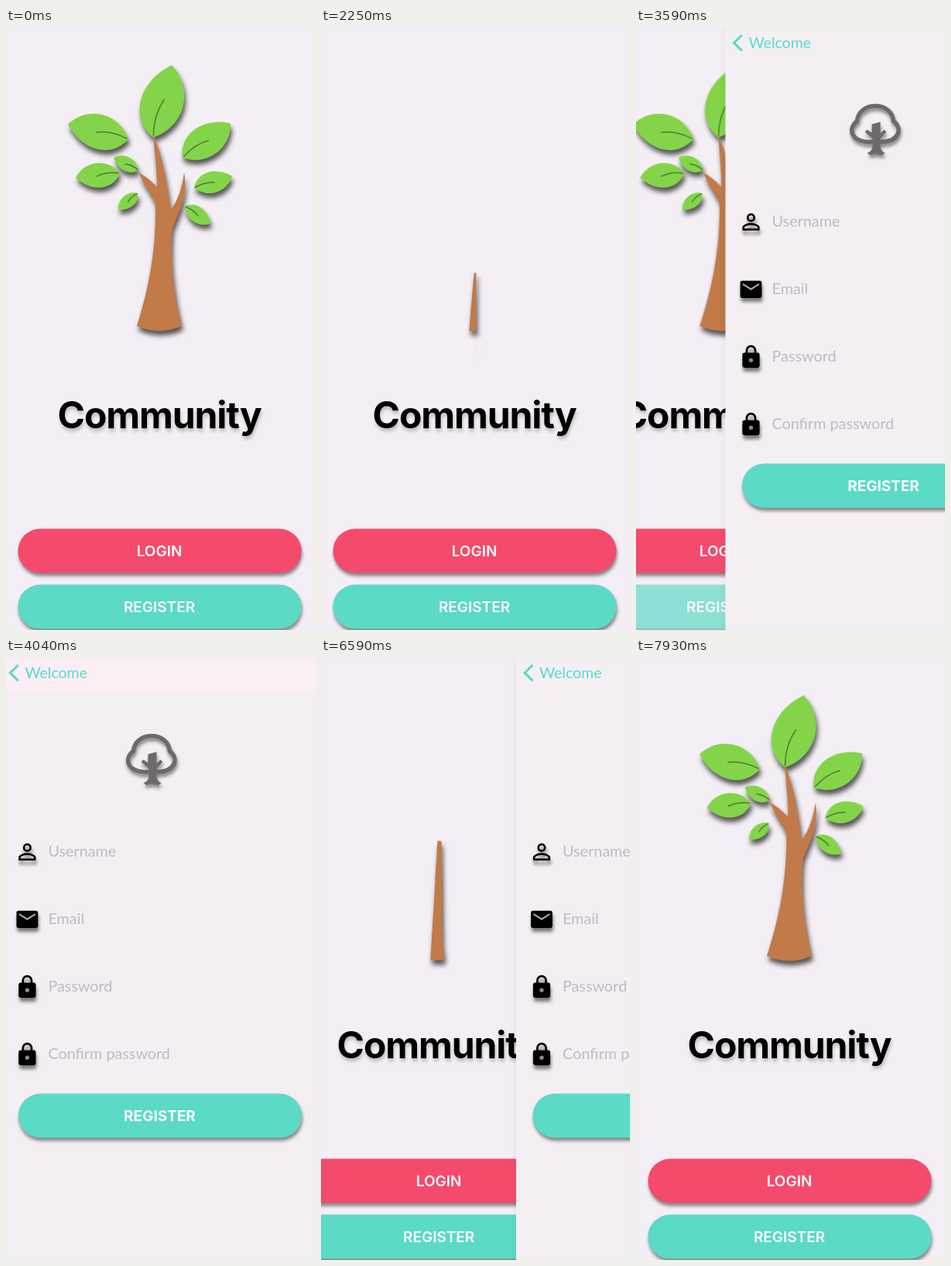
Animation, 399 px wide and 776 px high, one loop 8000 ms. Source, as an HTML page:

```html
<!DOCTYPE html>
<html lang="en">
<head>
<meta charset="utf-8">
<style>
  html, body { margin: 0; width: 100%; height: 100%; overflow: hidden; background: #f4eff5; }
  svg { display: block; width: 100%; height: 100%; }
  .title { font: 700 48px Inter, sans-serif; letter-spacing: -1.1px; filter: drop-shadow(1px 4px 2px rgba(0,0,0,.22)); }
  .label { font: 600 19px Inter, sans-serif; fill: #fff; }
  .field { font: 400 19.8px Lato, sans-serif; fill: #bfbbc0; }
  .back { font: 400 19.5px Lato, sans-serif; fill: #5bdac5; }
  .mid { text-anchor: middle; }
  .lift { filter: drop-shadow(1px 4px 2px rgba(0,0,0,.45)); }
  .icons { filter: drop-shadow(1px 5px 2px rgba(0,0,0,.5)); }
  .tree { filter: drop-shadow(2px 6px 3px rgba(0,0,0,.65)); }
  .line { fill: none; stroke: #000; stroke-width: 1.9; }
</style>
</head>
<body>
<svg viewBox="0 0 399 776" preserveAspectRatio="none">
  <defs>
    <linearGradient id="edge"><stop stop-color="#000" stop-opacity="0"/><stop offset="1" stop-color="#000" stop-opacity=".03"/></linearGradient>
    <g id="lock">
      <rect x="4" y="8" width="16" height="14" rx="2"/>
      <path class="line" d="M8 9V6a4 4 0 0 1 8 0v3"/>
      <circle cx="12" cy="15" r="1.9" fill="#8d8a8e"/>
    </g>
  </defs>
  <rect width="399" height="776" fill="#f4eff5"/>
  <g id="home">
    <g class="tree"><g id="crown"><path id="trunk" fill="#c17a48"/><g id="leaves"></g></g></g>
    <text class="title mid" x="198" y="516">Community</text>
    <g id="login"></g>
    <g id="register"></g>
  </g>
  <g id="page">
    <rect x="-14" width="8" height="776" fill="url(#edge)"/>
    <rect x="-6" width="411" height="776" fill="#f4eff3"/>
    <rect id="bar" x="-6" width="411" height="43" fill="#fbeef4"/>
    <path d="M15.500 9 5 19.200 15.500 29.400" fill="none" stroke="#5bdac5" stroke-width="3"/>
    <text class="back" x="24" y="26">Welcome</text>
    <g class="lift" fill="#6e696d">
      <path d="M164 120C166 94 209 94 211 120C223 129 219 146 195 147L180 147C155 146 152 129 164 120Z" fill="none" stroke="#6e696d" stroke-width="5.500"/>
      <path d="M183 124 194 121V136L199 131 202 134 194 142V154Q195 159 200 161L196 164 188 162 181 164 177 161Q183 159 184 154V142L174 134 177 131 183 135Z"/>
    </g>
    <g class="icons">
      <g transform="translate(10.300 233.300) scale(1.390)">
        <circle class="line" cx="12" cy="8" r="3.050"/>
        <path class="line" d="M4.950 19.050V17c0-1.800 4.400-3.050 7.050-3.050s7.050 1.250 7.050 3.050v2.050z"/>
      </g>
      <g transform="translate(10.300 320.300) scale(1.390)">
        <rect x="2" y="4" width="20" height="16" rx="2"/>
        <path d="M4.500 7 12 11.800 19.500 7" fill="none" stroke="#aaa7aa" stroke-width="1.500"/>
      </g>
      <use href="#lock" transform="translate(10.300 407.300) scale(1.390)"/>
      <use href="#lock" transform="translate(10.300 494.300) scale(1.390)"/>
    </g>
    <g id="fields"></g>
    <g id="submit"></g>
  </g>
</svg>
<script>
const LOOP = 8000, PAGE_W = 411;
const $ = id => document.getElementById(id);
const clamp = v => Math.min(1, Math.max(0, v));
const mix = (a, b, k) => a + (b - a) * k;
const smooth = v => (v = clamp(v)) * v * (3 - 2 * v);

function button(id, y, color, text) {
  $(id).innerHTML = `<rect class="lift" x="15.500" y="${y}" width="366" height="57" rx="28.500" fill="${color}"/>
    <text class="label mid" x="198" y="${y + 35.5}">${text}</text>`;
}
button('login', 645.5, '#f44b6c', 'LOGIN');
button('register', 717.5, '#5bdac5', 'REGISTER');
button('submit', 561.5, '#5bdac5', 'REGISTER');
$('submit').lastElementChild.style.fontWeight = 700;

$('fields').innerHTML = ['Username', 'Email', 'Password', 'Confirm password']
  .map((s, i) => `<text class="field" x="54" y="${256 + 87 * i}">${s}</text>`).join('');

// base x, y, tip x, y, bulge, start and length of growth in seconds
const leaves = [
  [190, 141, 214, 48, .38, .45, .4],
  [158, 143, 80, 124, .37, .5, .4],
  [228, 167, 290, 123, .36, .55, .4],
  [243, 206, 292, 191, .36, .6, .4],
  [171, 183, 139, 167, .34, .65, .4],
  [231, 230, 264, 252, .34, .7, .45],
  [170, 213, 145, 234, .34, .7, .45],
  [147, 187, 90, 193, .37, .7, .5]
].map(([x, y, tx, ty, b, start, span]) => {
  const g = document.createElementNS('http://www.w3.org/2000/svg', 'g');
  const flip = tx < x ? 1 : -1;
  g.innerHTML = `<path fill="#84d449" d="M0 0C.18 ${-b} .68 ${-b} 1 0C.76 ${b} .24 ${b} 0 0Z"/>
    <path fill="none" stroke="#4c7a36" stroke-width="1.500" vector-effect="non-scaling-stroke" d="M.02 0Q.3 ${.07 * flip} .53 ${-.02 * flip}"/>`;
  $('leaves').append(g);
  const len = Math.hypot(tx - x, ty - y), angle = Math.atan2(ty - y, tx - x) * 180 / Math.PI;
  return age => {
    const k = smooth((age - start) / span) * len;
    g.setAttribute('display', k > .5 ? 'inline' : 'none');
    g.setAttribute('transform', `translate(${x} ${y}) rotate(${angle}) scale(${k})`);
  };
});

const growth = [[0, 0], [.2, 72], [.37, 152], [.6, 215], [1.09, 240], [1.35, 248]];
function stemHeight(age) {
  const i = growth.findIndex(p => p[0] > age);
  if (i < 0) return 248;
  const [a, h] = growth[i - 1], [b, j] = growth[i];
  return mix(h, j, (age - a) / (b - a));
}

// A straight taper that opens into the curved trunk with two branches.
function trunkPath(age) {
  const open = clamp(age - .35), k = stemHeight(age) / 248;
  const width = Math.min(20, 46 * age);
  const p = (side, x, y, drop = 0) => {
    const u = (388 - y) / 248;
    const thin = 196 + 3 * u + side * width / 2 * (1 - .7 * u);
    return `${mix(thin, x, open).toFixed(2)} ${(388 - (388 - y) * k + drop * (1 - open)).toFixed(2)} `;
  };
  const L = (...a) => p(-1, ...a), R = (...a) => p(1, ...a);
  return 'M' + L(169, 384, 4) +
    'C' + L(183, 340) + L(194, 290) + L(193, 228) +
    'C' + L(191, 216) + L(180, 207) + L(171, 186) +
    'Q' + L(184, 193) + L(195, 205) +
    'Q' + L(195, 186) + L(190, 140) +
    'L' + R(191, 140) +
    'C' + R(201, 162) + R(207, 195) + R(213, 234, 60) +
    'Q' + R(226, 217, 75) + R(230, 186, 95) +
    'C' + R(235, 214, 85) + R(226, 232, 80) + R(215, 258, 75) +
    'C' + R(211, 300, 40) + R(217, 342) + R(227, 384, 4) +
    'Q' + R(198, 384 + 13 * open, 4) + L(169, 384, 4) + 'Z';
}

function treeAge(t) {
  if (t < 2050) return 9;
  return (t - (t < 6220 ? 2050 : 6220)) / 1000;
}

function sway(t, age) {
  if (age === 9) return t < 1350 ? -1.6 * Math.sin(t / 1350 * 2 * Math.PI) : 0;
  return 4 * Math.sin(Math.PI * clamp((age - 1.25) / .6));
}

function pageX(t) {
  if (t < 3427 || t > 6832) return PAGE_W;
  if (t < 6250) {
    const w = (t - 3427) * .015;
    return PAGE_W * (1 + w) * Math.exp(-w);
  }
  return PAGE_W * smooth((t - 6250) / 582);
}

function pressAlpha(t) {
  if (t < 3000 || t > 3690) return 1;
  return t < 3450 ? mix(1, .19, clamp((t - 3000) / 120)) : mix(.19, 1, (t - 3450) / 240);
}

function draw(t) {
  const age = treeAge(t), lean = sway(t, age) / 340, x = pageX(t);
  $('trunk').setAttribute('d', trunkPath(age));
  leaves.forEach(grow => grow(age));
  $('crown').setAttribute('transform', `matrix(1 0 ${-lean} 1 ${390 * lean} 0)`);
  $('home').setAttribute('transform', `translate(${-.3 * (PAGE_W - x)} 0)`);
  $('page').setAttribute('transform', `translate(${x} 0)`);
  $('page').setAttribute('display', x < PAGE_W ? 'inline' : 'none');
  $('bar').setAttribute('opacity', clamp(1 - x / 60));
  $('register').setAttribute('opacity', pressAlpha(t));
}

const begin = performance.now();
function tick() {
  draw((performance.now() - begin) % LOOP);
  requestAnimationFrame(tick);
}
tick();
</script>
</body>
</html>
```
